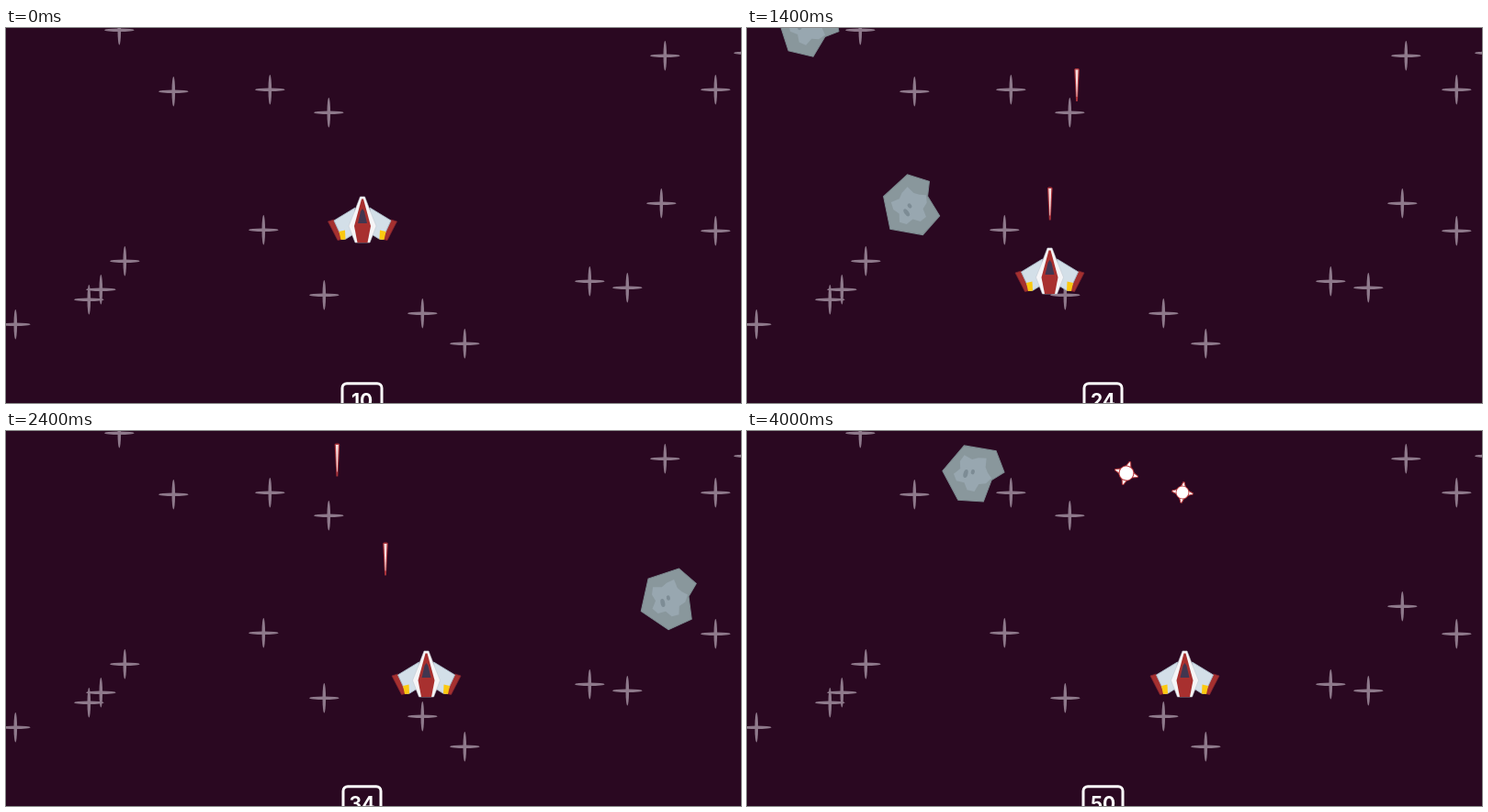
Recreate the animation shown at these times as an HTML page with a canvas. Size 800 by 409 pixels, loop 4200 ms.

```html
<!DOCTYPE html>
<html>
<head>
<meta charset="utf-8">
<style>
  html, body { margin: 0; width: 100%; height: 100%; overflow: hidden; background: #2a0821; }
  canvas { display: block; }
</style>
</head>
<body>
<canvas id="stage" width="800" height="409"></canvas>
<script>
const ctx = document.getElementById('stage').getContext('2d');
const LOOP = 4200, STEP = 200;
const SHOT_SPEED = 0.27, SHOT_LENGTH = 36;

const stars = [
  [123, 2], [182, 69], [287, 67], [351, 92], [280, 220], [129, 254], [103, 285],
  [90, 296], [10, 323], [346, 291], [453, 311], [499, 344], [635, 276], [676, 283],
  [713, 191], [772, 221], [717, 30], [772, 67], [808, 27]
];

// Turning points of the ship: [time, value]
const pathX = [[230, 388], [465, 359], [1000, 359], [1230, 329.5], [1400, 329.5],
               [2035, 413], [2535, 474], [2826, 474], [2846, 476.5]];
const pathY = [[230, 209], [670, 265]];

// Launch times; a shot with an end bursts at that height
const shots = [{ t: 248 }, { t: 748 }, { t: 1228 }, { t: 1635 },
               { t: 2035, end: 46 }, { t: 2826, end: 67 }];

// Place and angle at time t, velocity and spin per step
const rocks = [
  { t: 1000, x: 168, y: 70, vx: 5.4, vy: 63.2, a: 0, spin: -18 },
  { t: 1400, x: 65, y: 0, vx: -26, vy: 60.4, a: 26, spin: -15 },
  { t: 2400, x: 721.5, y: 185, vx: -15.7, vy: 62, a: -12, spin: -15 },
  { t: 4000, x: 245, y: 47.5, vx: -21, vy: 61, a: 16, spin: -15 }
];

function along(path, t) {
  const n = path.findIndex(p => p[0] > t);
  if (n < 0) return path[path.length - 1][1];
  if (n === 0) return path[0][1];
  const [t0, a] = path[n - 1], [t1, b] = path[n];
  return a + (b - a) * (t - t0) / (t1 - t0);
}

function poly(p, fill, stroke, width = 1) {
  ctx.beginPath();
  for (let i = 0; i < p.length; i += 2) ctx.lineTo(p[i], p[i + 1]);
  ctx.closePath();
  ctx.fillStyle = fill;
  ctx.fill();
  if (stroke) {
    ctx.strokeStyle = stroke;
    ctx.lineWidth = width;
    ctx.stroke();
  }
}

function oval(x, y, rx, ry, fill) {
  ctx.beginPath();
  ctx.ellipse(x, y, rx, ry, 0, 0, 7);
  ctx.fillStyle = fill;
  ctx.fill();
}

function at(x, y, deg, draw) {
  ctx.save();
  ctx.translate(x, y);
  ctx.rotate(deg * Math.PI / 180);
  draw();
  ctx.restore();
}

function star([x, y]) {
  oval(x + 0.3, y + 0.3, 16.3, 1.8, '#8e798b');
  oval(x + 0.3, y + 0.3, 1.8, 16.3, '#8e798b');
}

function rock() {
  poly([-32, 5, -17, -28, 18, -32, 33, -12, 22, 0, 20, 25, -7, 31], '#89979c', '#7d8b91');
  const blob = [];
  for (let a = 0; a < 6.28; a += 0.4) {
    const r = 18 + 4 * Math.sin(5 * a + 1);
    blob.push(r * Math.cos(a), r * Math.sin(a) - 2);
  }
  poly(blob, '#98a7b0');
  oval(-7, 1, 2.4, 4.6, '#7d8c95');
  oval(0, -3, 2, 2.8, '#7d8c95');
}

function shot() {
  const h = SHOT_LENGTH;
  poly([-2.8, 1, -1.5, 0, 1.5, 0, 2.8, 1, 0.9, h, -0.9, h], '#a8323a');
  poly([-1.5, 1.5, 1.5, 1.5, 0.3, h - 5, -0.3, h - 5], '#f6dcdc');
}

function ship() {
  for (const side of [1, -1]) {
    ctx.save();
    ctx.scale(side, 1);
    poly([-37.5, 2, -31, 0, -20, 21, -27, 22.5], '#a5302f', '#7f2430', 0.8);
    poly([-8, -13, -31, 1, -21.5, 21.5, -18, 21, -10, 16], '#d3dfe8', '#a9bac8', 0.9);
    poly([-25.5, 13, -19, 11.5, -18.5, 21.5, -23.5, 22], '#fbc910');
    ctx.restore();
  }
  poly([-2.5, -25, 2.5, -25, 9, -8, 15, 7, 8, 25, -8, 25, -15, 7, -9, -8], '#f5f5f7', '#c3c9d2', 0.6);
  poly([-1, -22.5, 1, -22.5, 9, 7, 5.5, 25, -5.5, 25, -9, 7], '#a8302f');
  poly([0, -12, 2, -9, 5, 4, -5, 4, -2, -9], '#413650');
}

function burst(r) {
  for (let i = 0; i < 4; i++) {
    poly([-r * 0.24, -r * 0.5, -r * 0.06, -r, r * 0.06, -r, r * 0.24, -r * 0.5], '#fff', '#b5383c');
    ctx.rotate(Math.PI / 2);
  }
  oval(0, 0, r * 0.66, r * 0.66, '#b5383c');
  oval(0, 0, r * 0.58, r * 0.58, '#fff');
}

function fire(s, t) {
  if (t < s.t) return;
  const x = along(pathX, s.t), start = along(pathY, s.t) - 45;
  const y = start - SHOT_SPEED * (t - s.t);
  const age = s.end ? (s.end - SHOT_LENGTH / 2 - y) / SHOT_SPEED : -1;
  if (age < 0) at(x, y, 0, shot);
  else at(x, s.end, age * 0.014, () => burst(13 * (1 - Math.exp(-age / 270))));
}

function counter(n) {
  const w = n % 10 ? 41 : 43;
  ctx.strokeStyle = ctx.fillStyle = '#fff';
  ctx.lineWidth = 3;
  ctx.beginPath();
  ctx.roundRect(387.5 - w / 2, 387.7, w, 38, 5);
  ctx.stroke();
  ctx.font = '700 21px Inter, sans-serif';
  ctx.textAlign = 'center';
  ctx.fillText(n, 387.5, 413.5);
}

function frame(now) {
  const i = Math.floor(now % LOOP / STEP), t = i * STEP;
  ctx.fillStyle = '#2a0821';
  ctx.fillRect(0, 0, 800, 409);
  stars.forEach(star);
  for (const s of shots) fire(s, t);
  at(along(pathX, t), along(pathY, t), 0, ship);
  for (const r of rocks) {
    const k = (t - r.t) / STEP;
    at(r.x + r.vx * k, r.y + r.vy * k, r.a + r.spin * k, rock);
  }
  counter(10 + 2 * i);
  requestAnimationFrame(frame);
}
requestAnimationFrame(frame);
</script>
</body>
</html>
```
